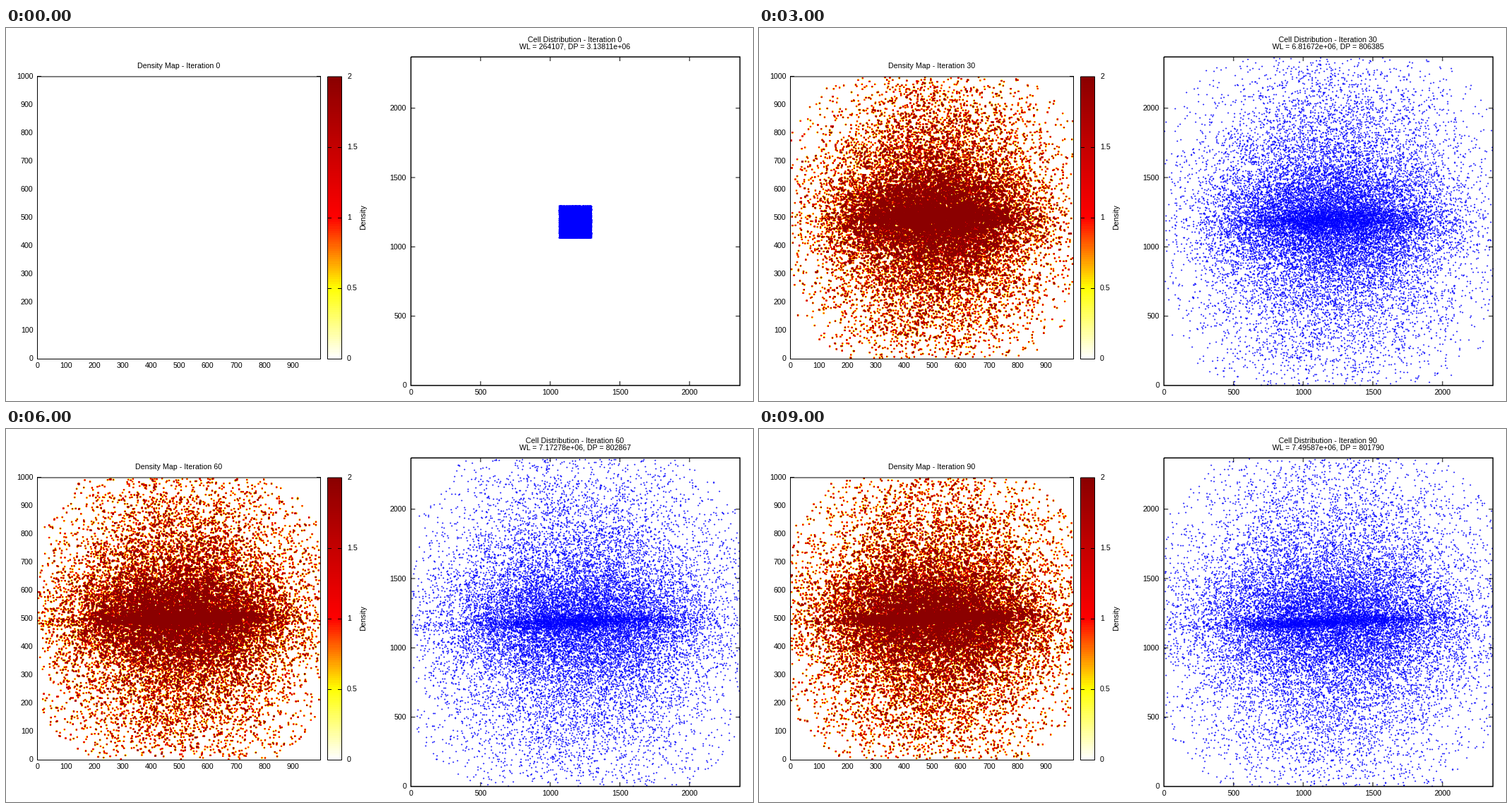
A matplotlib script that plays this animation: 1058 by 529 pixels, repeating every 10000 ms.

```python
import numpy as np
import matplotlib.pyplot as plt
from matplotlib.animation import FuncAnimation
from matplotlib.colors import LinearSegmentedColormap

W, H, DPI = 1058, 529, 100
PX = 72 / DPI
COUNT = 21000
SPAN_X, SPAN_Y = 2362, 2370
MAP = 400
CELL = 2.4  # cell width in map pixels

STATS = ["WL = 264107, DP = 3.13811e+06", "WL = 6.50418e+06, DP = 823946",
         "WL = 6.68294e+06, DP = 808854", "WL = 6.81672e+06, DP = 806385",
         "WL = 6.94559e+06, DP = 804927", "WL = 7.06091e+06, DP = 803741",
         "WL = 7.17278e+06, DP = 802867", "WL = 7.28433e+06, DP = 801156",
         "WL = 7.3948e+06, DP = 801880", "WL = 7.49587e+06, DP = 801790"]

plt.rcParams["font.family"] = "Liberation Sans"
plt.rcParams["font.size"] = 10.67 * PX
heat = LinearSegmentedColormap.from_list(
    "heat", [(0, "white"), (0.25, "yellow"), (0.5, "red"), (1, "#8b0000")], N=128)

rng = np.random.default_rng(7)
start = rng.uniform((1064, 1066), (1293, 1296), (COUNT, 2)).T
normal_a = rng.normal(size=(2, COUNT))
normal_b = rng.normal(size=(2, COUNT))
weight = rng.uniform(1.0, 1.8, COUNT)
kind = rng.choice(3, COUNT, p=[0.09, 0.31, 0.60])  # core, middle, halo


def cells(step):
    """Cell positions in layout units after 10 * step iterations."""
    if step == 0:
        return start
    turn = 0.12 * step
    zx, zy = normal_a * np.cos(turn) + normal_b * np.sin(turn)
    grow = 1 - np.exp(-step / 3)
    sx = np.array([190 + 230 * grow, 300 + 200 * grow, 345 + 215 * grow])
    sy = np.array([24 + 100 * np.exp(-step / 2), 170 + 30 * grow, 490 + 110 * grow])
    x = 1195 + sx[kind] * zx
    y = 1188 + sy[kind] * zy
    bend = 20 * np.clip((step - 3) / 4, 0, 1)
    y += np.where(kind == 0, bend * np.tanh((x - 1200) / 300), 0)
    inside = (x > 4) & (x < SPAN_X - 4) & (y > 4) & (y < SPAN_Y - 4)
    inside &= np.hypot(x - 1195, y - 1188) < 1420
    return np.where(inside, x, np.nan), np.where(inside, y, np.nan)


def density(step):
    """Spread every cell over the map pixels that it covers."""
    if step == 0:
        return np.zeros((MAP, MAP))
    x, y = cells(0 if step == 1 else step)
    ok = ~np.isnan(x)
    u = x[ok] / SPAN_X * MAP - CELL / 2
    v = (1 - y[ok] / SPAN_Y) * MAP - CELL / 2
    iu, iv = np.floor(u).astype(int), np.floor(v).astype(int)

    def cover(offset, k):
        return np.clip(np.minimum(k + 1, offset + CELL) - np.maximum(k, offset), 0, 1)

    pad = 4
    grid = np.zeros((MAP + 2 * pad, MAP + 2 * pad))
    for j in range(4):
        for i in range(4):
            part = weight[ok] * cover(u - iu, i) * cover(v - iv, j)
            np.add.at(grid, (iv + j + pad, iu + i + pad), part)
    return grid[pad:-pad, pad:-pad]


fig = plt.figure(figsize=(W / DPI, H / DPI), dpi=DPI, facecolor="white")
ax = fig.add_axes([0, 0, 1, 1])


def line(xs, ys, width=1):
    ax.plot(xs, ys, color="black", lw=width * PX, zorder=5, snap=False,
            solid_capstyle="butt", solid_joinstyle="miter")


def box(x0, y0, x1, y1, width=1):
    line([x0, x1, x1, x0, x0], [y0, y0, y1, y1, y0], width)


def label(x, y, text, ha="center"):
    return ax.text(x, y + 4, text, ha=ha, va="baseline", color="black")


def picture(data, x0, x1):
    return ax.imshow(data, cmap=heat, vmin=0, vmax=2, interpolation="nearest",
                     extent=(x0, x1, 469, 69), aspect="auto")


# Density map and its colour scale
heat_map = picture(np.zeros((MAP, MAP)), 45, 445)
picture(np.linspace(2, 0, 128)[:, None], 455, 475)
box(44.5, 69, 445.5, 469.5)
box(455.5, 69, 475.5, 469.5)
line([44, 50], [68.5, 68.5])
line([440, 446], [68.5, 68.5])
for value in range(0, 1001, 100):
    label(38.5, 468.5 - 0.4005 * value, str(value), "right")
    if value < 1000:
        label(45 + 0.4012 * value, 478.5, str(value))
for value in (0, 0.5, 1, 1.5, 2):
    y = 469.5 - 200 * value
    label(483, y - 1, f"{value:g}", "left")
    if 0 < value < 2:
        line([455, 461], [y, y])
        line([470, 476], [y, y])
ax.text(509, 268.5, "Density", rotation=90, rotation_mode="anchor",
        ha="center", va="baseline")

# Cell distribution
LEFT, RIGHT, TOP, BOTTOM = 573.5, 1039.5, 41, 507
SX, SY = (RIGHT - LEFT) / SPAN_X, (BOTTOM - TOP) / SPAN_Y
box(LEFT, TOP, RIGHT, BOTTOM, 1.5)
for value in range(0, 2001, 500):
    x, y = LEFT + SX * value, BOTTOM - SY * value
    label(x + 0.5, 516.5, str(value))
    label(567, y - 0.5, str(value), "right")
    if value:
        line([x, x], [TOP, TOP + 6])
        line([x, x], [BOTTOM - 6, BOTTOM])
        line([LEFT, LEFT + 6], [y, y])
        line([RIGHT - 6, RIGHT], [y, y])
dots, = ax.plot([], [], "o", color="blue", ms=1.9 * PX, mew=0, zorder=3)

map_title = label(244.5, 53, "")
cell_title = label(806, 15.5, "")
cell_stats = label(806, 25.5, "")

ax.set_xlim(0, W)
ax.set_ylim(H, 0)
ax.axis("off")


def update(step):
    x, y = cells(step)
    dots.set_data(LEFT + SX * x, BOTTOM - SY * y)
    heat_map.set_data(density(step))
    map_title.set_text(f"Density Map - Iteration {10 * step}")
    cell_title.set_text(f"Cell Distribution - Iteration {10 * step}")
    cell_stats.set_text(STATS[step])
    return heat_map, dots, map_title, cell_title, cell_stats


anim = FuncAnimation(fig, update, frames=len(STATS), interval=1000,
                     repeat=True, repeat_delay=0)
plt.show()
```
